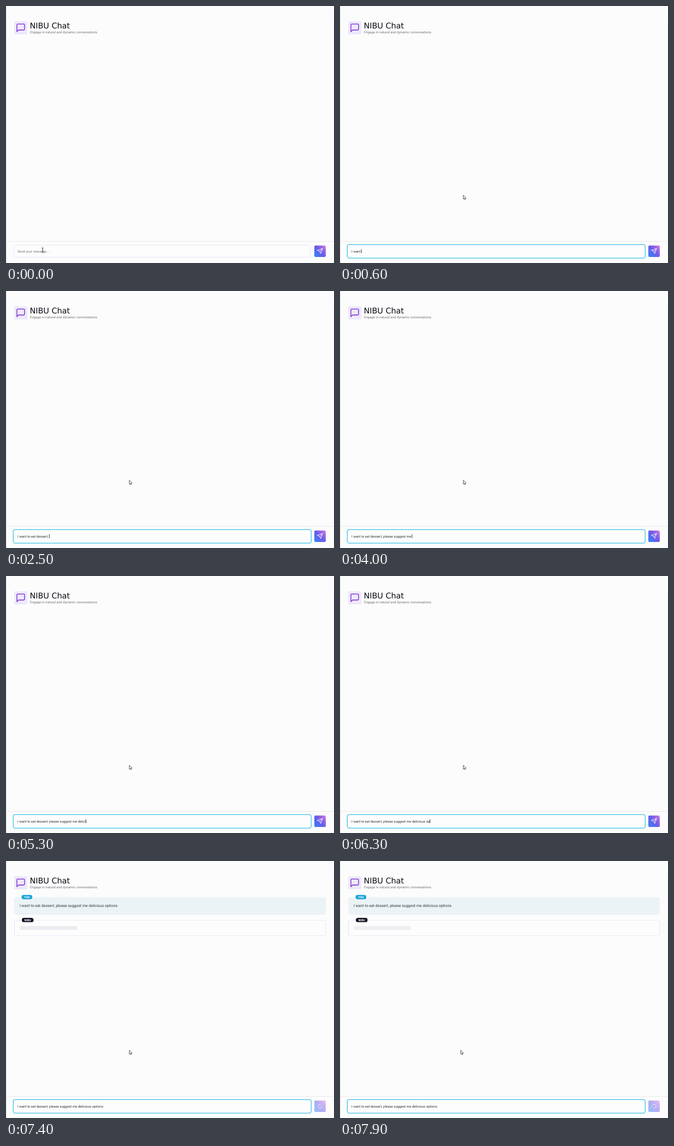
Write an HTML page that moves like this. It is 600 px wide and 470 px high and loops after 8000 ms.

```html
<!DOCTYPE html>
<html lang="en">
<head>
<meta charset="utf-8">
<title>Chat</title>
<style>
html, body { margin: 0; width: 100%; height: 100%; overflow: hidden; background: #fcfcfc; }
svg { display: block; }
text { font-family: Roboto, sans-serif; text-rendering: geometricPrecision; white-space: pre; }
.title { font: 500 14.4px "DejaVu Sans", sans-serif; fill: #0b0b14; }
.small { font-size: 6.1px; }
.msg { font-size: 6.96px; fill: #2f3338; }
.badge { font-size: 5.3px; font-weight: 700; fill: #fff; text-anchor: middle; }
.icon { fill: none; stroke-width: 2; stroke-linecap: round; stroke-linejoin: round; }
</style>
</head>
<body>
<svg width="600" height="470" viewBox="0 0 600 470">
  <defs>
    <linearGradient id="grad" x1="0" y1=".85" x2="1" y2="0">
      <stop offset="0" stop-color="#3583f3"/>
      <stop offset=".45" stop-color="#6b5cea"/>
      <stop offset=".75" stop-color="#a068e6"/>
      <stop offset="1" stop-color="#dc8ce0"/>
    </linearGradient>
  </defs>
  <rect width="600" height="470" fill="#fcfcfc"/>
  <path d="M.5 0V470" stroke="#dfdfe2"/>
  <path d="M599.5 28V470" stroke="#f0eefb"/>
  <path d="M1 430.5H599" stroke="#e9e9ec"/>

  <rect x="15" y="28" width="24" height="24" rx="1.5" fill="#ede9fc"/>
  <path class="icon" stroke="#8a3fd6" transform="translate(17.6 30.6) scale(.78)"
    d="M21 15a2 2 0 0 1-2 2H7l-4 4V5a2 2 0 0 1 2-2h14a2 2 0 0 1 2 2z"/>
  <text class="title" x="43.4" y="40.7">NIBU Chat</text>
  <text class="small" x="44" y="49.7" fill="#74747c">Engage in natural and dynamic conversations.</text>

  <g id="chat">
    <rect x="15" y="66.5" width="570" height="31" rx="3" fill="#ecf3f6"/>
    <path d="M17 97.3H583" stroke="#e0e9ee" stroke-width=".8"/>
    <rect x="28.5" y="62" width="19.6" height="8" rx="4" fill="#1ca6da"/>
    <text class="badge" x="38.4" y="67.9">YOU</text>
    <text class="msg" id="sent" x="25" y="84.1"></text>
    <rect x="15.5" y="108.5" width="569" height="28" rx="2" fill="#fdfdfd" stroke="#ebebf6"/>
    <path d="M15.5 110V135" stroke="#e2e0fb"/>
    <rect x="29" y="104" width="21.4" height="7.8" rx="3.9" fill="#0b0d1c"/>
    <text class="badge" x="39.7" y="109.8">NIBU</text>
    <rect id="skeleton" x="25" y="119" width="105" height="7" rx="3" fill="#ebebf0"/>
  </g>

  <rect id="field" x="14.5" y="437.5" width="542" height="22" rx="2" fill="#fdfdfd" stroke="#eae8fb"/>
  <rect id="ring" x="13.3" y="436.3" width="545" height="24.8" rx="3.5" fill="#fdfdfd" stroke="#3fc3e6" stroke-width="1.3"/>
  <text class="small" id="hint" x="21" y="450.5" fill="#74747c">Send your message...</text>
  <text class="small" id="typed" x="21" y="450.5" fill="#2d2f36"></text>
  <rect id="caret" y="444.8" width=".8" height="7.2" fill="#15151c"/>

  <rect id="button" x="564" y="438" width="21" height="21" rx="2.2" fill="url(#grad)"/>
  <path class="icon" id="send" stroke="#fff" transform="translate(568.8 442.8) scale(.46)"
    d="M22 2l-7 20-4-9-9-4zM22 2L11 13"/>
  <path class="icon" id="spinner" stroke="#fff" d="M9 0A9 9 0 1 1 2.78-8.56"/>

  <path id="beam" d="M-1.6-4Q0-4 0-3Q0-4 1.6-4M0-3.2V3.2M-1.6 4Q0 4 0 3Q0 4 1.6 4" fill="none" stroke="#222" stroke-width=".9"
    transform="translate(67 446.3)"/>
  <path id="arrow" d="M0 0V7.2L1.6 5.8L2.7 8.2L3.9 7.6L2.9 5.3H5Z" fill="#fff" stroke="#33333a" stroke-width=".8" stroke-linejoin="round"/>
</svg>
<script>
const LOOP = 8000, FOCUS = 100, SUBMIT = 7400;

// Bursts of typing: text, time of first key, time of last key
const bursts = [
  ["I want ", 300, 600], ["to eat dessert, ", 700, 2200], ["please ", 3000, 3300],
  ["suggest me ", 3500, 4000], ["de", 4200, 4400], ["li", 4600, 5000],
  ["ci", 5200, 5300], ["ous ", 5500, 5900], ["options", 6100, 6900]
];
const message = bursts.map(b => b[0]).join("");
const keys = bursts.flatMap(([s, from, to]) =>
  [...s].map((_, i) => from + (to - from) * i / (s.length - 1)));

const el = Object.fromEntries([...document.querySelectorAll("[id]")].map(e => [e.id, e]));
const show = (e, on) => e.setAttribute("visibility", on ? "visible" : "hidden");
const ease = (t, from, to) => {
  const p = Math.min(1, Math.max(0, (t - from) / (to - from)));
  return p * p * (3 - 2 * p);
};
el.sent.textContent = message;

function draw(now) {
  const t = Math.floor(now % LOOP / 100) * 100;
  const count = keys.filter(k => k <= t + 1).length;
  const focused = t >= FOCUS, busy = t >= SUBMIT;

  show(el.ring, focused);
  show(el.field, !focused);
  show(el.hint, !count);
  el.typed.textContent = message.slice(0, count);
  const last = count ? keys[count - 1] : FOCUS;
  show(el.caret, focused && !busy && (t - last) % 1000 < 500);
  el.caret.setAttribute("x", 20.8 + (count ? el.typed.getComputedTextLength() : 0));

  show(el.chat, busy);
  show(el.send, !busy);
  show(el.spinner, busy);
  el.button.setAttribute("opacity", busy ? .5 : 1);
  el.skeleton.setAttribute("opacity", .75 + .25 * Math.cos((t - SUBMIT) / 1000 * Math.PI));
  el.spinner.setAttribute("transform",
    `translate(574.5 448.4) rotate(${(t - SUBMIT) * .36}) scale(.4)`);

  const move = ease(t, 100, 500);
  show(el.beam, t < 200);
  show(el.arrow, t >= 200);
  const x = 66 + 159.6 * move - 4.8 * ease(t, 7400, 7800);
  el.arrow.setAttribute("transform", `translate(${x} ${442 - 96 * move})`);
}

const start = performance.now();
(function tick() {
  draw(performance.now() - start);
  requestAnimationFrame(tick);
})();
</script>
</body>
</html>
```
